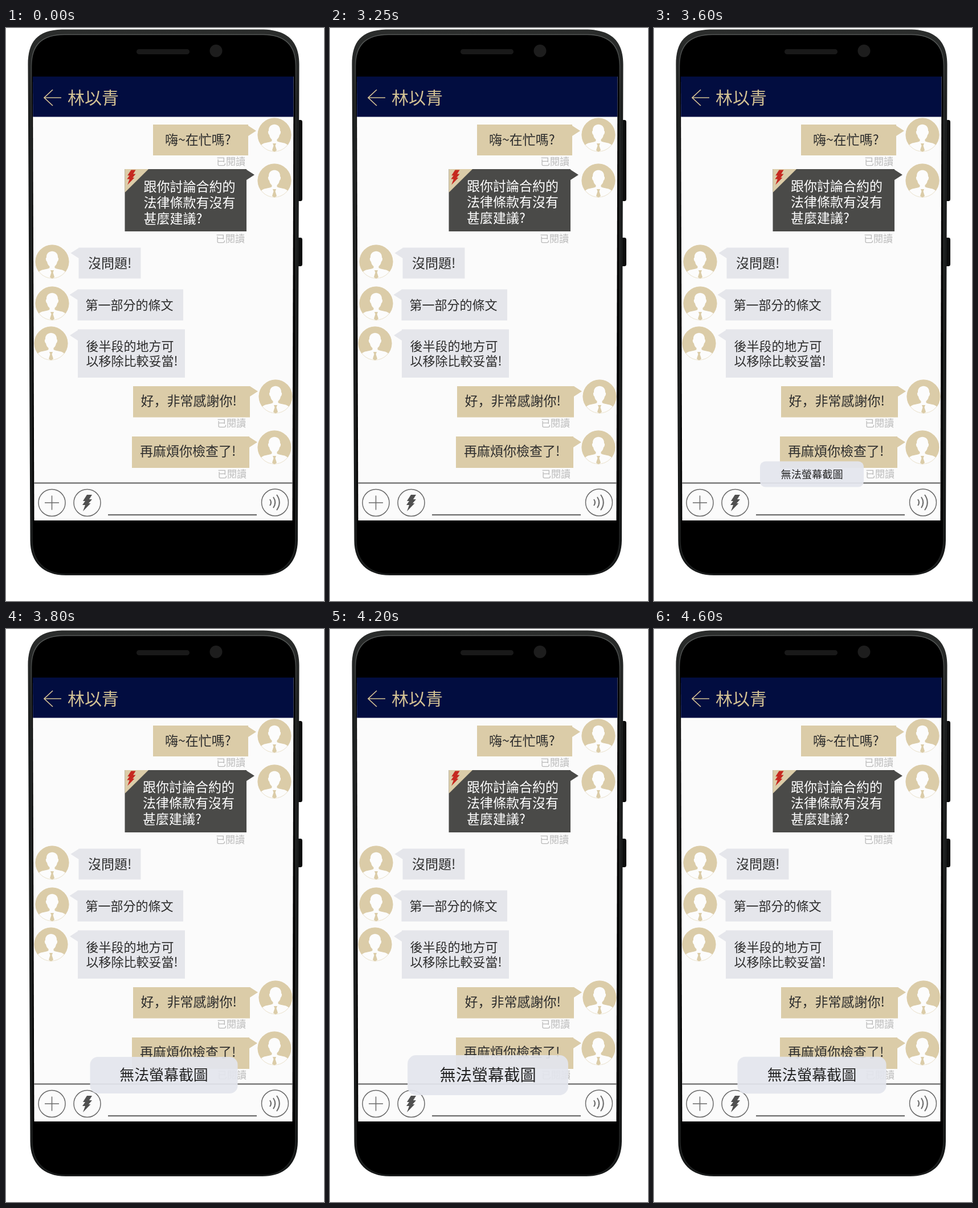
An HTML page that plays this animation: 558x1003 px, repeating every 5700 ms.

```html
<!DOCTYPE html>
<html lang="zh-Hant">
<head>
<meta charset="utf-8">
<title>聊天畫面</title>
<style>
  html, body { margin: 0; width: 100%; height: 100%; overflow: hidden; background: #fff; }
  svg { display: block; width: 558px; height: 1003px; }
  text { font-family: "Noto Sans CJK TC", "Noto Sans CJK", "Noto Sans", sans-serif; white-space: pre; }
  .comma { font-family: "Noto Sans CJK SC", "Noto Sans CJK", sans-serif; }
</style>
</head>
<body>
<svg viewBox="0 0 558 1003">
  <defs>
    <linearGradient id="rim" x1="0" y1="0" x2="0" y2="1">
      <stop offset="0" stop-color="#2b2d2c"/>
      <stop offset=".15" stop-color="#1c1e1e"/>
      <stop offset="1" stop-color="#161818"/>
    </linearGradient>
    <linearGradient id="edge" x1="0" y1="0" x2="0" y2="1">
      <stop offset="0" stop-color="#555857"/>
      <stop offset=".12" stop-color="#303332"/>
      <stop offset="1" stop-color="#1e2020"/>
    </linearGradient>
    <clipPath id="screen"><path d="M47 85H504.5L502.5 862H49.5Z"/></clipPath>
    <clipPath id="disc"><circle r="29.5"/></clipPath>
    <path id="bolt" d="M0-14H9L4-6H9L3 1H6.5L-7 15L-3 4H-8L-3-3H-7Z"/>
    <g id="avatar">
      <circle r="29.5" fill="#dbcca8"/>
      <g clip-path="url(#disc)">
        <path fill="#fcfcfc" d="M-10-7C-11-22 11-22 10-7C12-7 11-1 9 0C8 5 6 7 4.5 8V11C9 14 21 13 24 19V32H-24V19C-21 13-9 14-4.5 11V8C-6 7-8 5-9 0C-11-1-12-7-10-7Z"/>
        <path fill="#dbcca8" d="M-3 15H3L1.5 19L4 27L0 30L-4 27L-1.5 19Z"/>
      </g>
      <circle r="29" fill="none" stroke="#dbcca8" stroke-opacity=".45"/>
    </g>
  </defs>

  <!-- phone body -->
  <path d="M510 161H517Q520 161 520 165V299Q520 303 517 303H510ZM510 367H517Q520 367 520 371V413Q520 417 517 417H510Z" fill="#0c0d0d"/>
  <path d="M38.5 64C38.5 24 55 4 98 2.5H452C495 4 514.5 24 514.5 64L512 897C511.5 935 490 958 450 958H105C65 958 42.5 935 42.5 897Z" fill="url(#rim)"/>
  <path d="M44.5 66C45 30 62 12 102 11.5H451C490 12 508 30 508.5 66L508 897C507 933 487 956 450 956H105C68 956 46.5 933 46 897Z" fill="#000" stroke="url(#edge)" stroke-width="1.6"/>
  <rect x="229" y="37" width="93" height="9" rx="4.5" fill="#191919"/>
  <circle cx="368.5" cy="40" r="11" fill="#1d1d1d"/>

  <g clip-path="url(#screen)">
    <rect x="40" y="80" width="480" height="790" fill="#fbfbfb"/>
    <rect x="40" y="80" width="480" height="75.5" fill="#020d40"/>
    <path d="M97 122H67M82 108L67 122L82 136" fill="none" stroke="#d3c294" stroke-width="1.7"/>
    <g id="chat"></g>
    <path d="M40 796.5H510M179 852.3H440" stroke="#5c5c5c" stroke-width="2"/>
    <g fill="none" stroke="#6a6a6a" stroke-width="1.5">
      <circle cx="80.5" cy="831" r="23.5"/>
      <circle cx="142.5" cy="831" r="23.5"/>
      <circle cx="472" cy="830.5" r="23.5"/>
      <path d="M68 831H93M80.5 818.5V843.5"/>
      <path stroke-width="2" d="M463 825Q467 830.5 463 836M469 821Q475.5 830.5 469 840M475 817Q484.5 830.5 475 844"/>
    </g>
    <circle id="pressed" cx="140.5" cy="829" r="24" fill="#d9cb9c"/>
    <use href="#bolt" x="142" y="831" fill="#505050"/>
    <rect id="flash" x="40" y="80" width="480" height="790" fill="#fbfbfb" opacity=".84"/>
  </g>
  <g id="toast">
    <rect x="-130" y="-32.2" width="260" height="64.4" rx="14" fill="#e4e6ed" opacity=".93"/>
  </g>
</svg>
<script>
const LOOP = 5700, FLASH = 3000, AFTER = 3250, TOAST = 3500, PEAK = 3900, REST = 4600;
const TAN = '#dbcca8', GREY = '#e5e6eb', DARK = '#4a4a48', INK = '#2c2c2c';
const byId = id => document.getElementById(id);
const chat = byId('chat');

function add(parent, tag, attrs) {
  const el = document.createElementNS('http://www.w3.org/2000/svg', tag);
  for (const key in attrs) el.setAttribute(key, attrs[key]);
  return parent.appendChild(el);
}

// Text whose first line is centred on y; the comma sits low, at the left of its cell.
function write(parent, x, y, size, fill, lines, pitch = 0, extra = {}) {
  lines.split('\n').forEach((line, i) => {
    const el = add(parent, 'text', { x, y: y + i * pitch + size * 0.36, 'font-size': size, fill, ...extra });
    el.innerHTML = line.replace('，', '<tspan class="comma" lang="zh-Hans">，</tspan>');
  });
}

// Box with a pointer on its right (dir 1) or left (dir -1) side.
function bubble(left, top, right, bottom, fill, dir, tail) {
  const side = dir > 0 ? right : left;
  add(chat, 'path', {
    fill,
    d: `M${left} ${top}H${right}V${bottom}H${left}Z` +
       `M${side} ${tail - 9}L${side + 14 * dir} ${tail}L${side} ${tail + 9}Z`
  });
}

write(chat, 108, 122.5, 30, '#d3c294', '林以青');

bubble(258, 169, 425, 223, TAN, 1, 180);
bubble(208.5, 247, 422, 356, DARK, 1, 257);
bubble(127.5, 384.5, 236.5, 438.5, GREY, -1, 394);
bubble(125.5, 457.5, 311, 512, GREY, -1, 467);
bubble(126, 527.5, 314, 612, GREY, -1, 538);
bubble(223, 627, 428, 681.5, TAN, 1, 636);
bubble(221, 715, 427, 770, TAN, 1, 725);

add(chat, 'path', { d: 'M208.5 247H250L208.5 288Z', fill: TAN });
const cornerBolt = add(chat, 'use', { href: '#bolt', transform: 'translate(219.5 261) scale(.9)' });

[[471, 187], [471, 267], [81, 409], [81, 482], [79, 552], [473, 645], [471, 734]]
  .forEach(([x, y]) => add(chat, 'use', { href: '#avatar', x, y }));

write(chat, 279, 196, 23, INK, '嗨~在忙嗎?');
write(chat, 144, 412, 23, INK, '沒問題!');
write(chat, 139.5, 485.5, 22, INK, '第一部分的條文');
write(chat, 236.5, 652.5, 23, INK, '好，非常感謝你!');
write(chat, 235, 741, 23, INK, '再麻煩你檢查了!');
[[369, 234], [368, 369], [370, 692], [371, 781]]
  .forEach(([x, y]) => write(chat, x, y, 17, '#b9b9b9', '已閱讀'));

const usual = add(chat, 'g', {}), flashed = add(chat, 'g', {});
const question = add(usual, 'g', {});
write(question, 241.5, 278, 23, '#fff', '跟你討論合約的\n法律條款有沒有\n甚麼建議?', 28);
write(usual, 140.5, 557, 22, INK, '後半段的地方可\n以移除比較妥當!', 26.5);
write(flashed, 242.5, 277, 23, '#fff', '跟你討論內文的\n法律條款有沒有\n不合法的地方?', 28);
write(flashed, 137.5, 546.5, 22, INK, '要將A改為B，比\n較保障公司的權\n益喔!', 26.3);

const toast = byId('toast');
write(toast, 0, 0, 26, '#222', '無法螢幕截圖', 0, { 'text-anchor': 'middle' });

const show = (el, on) => el.setAttribute('display', on ? 'inline' : 'none');

// Grows past its size, then settles, in steps of 100 ms.
function toastWidth(t) {
  const step = Math.min(Math.floor(t / 100) * 100, REST);
  return step <= PEAK
    ? 143.5 + (step - TOAST) * 0.385
    : 297.5 - (step - PEAK) * 0.052;
}

function render(t) {
  const flash = t >= FLASH && t < AFTER;
  show(byId('flash'), flash);
  show(byId('pressed'), flash);
  show(flashed, flash);
  show(usual, !flash);
  cornerBolt.setAttribute('fill', flash ? '#4a4a4a' : '#c6281f');
  question.setAttribute('transform', t >= AFTER ? 'translate(-1.5 -1)' : '');
  show(toast, t >= TOAST);
  if (t >= TOAST) toast.setAttribute('transform', `translate(277 781) scale(${toastWidth(t) / 260})`);
}

const start = performance.now();
function tick() {
  render((performance.now() - start) % LOOP);
  requestAnimationFrame(tick);
}
tick();
</script>
</body>
</html>
```
